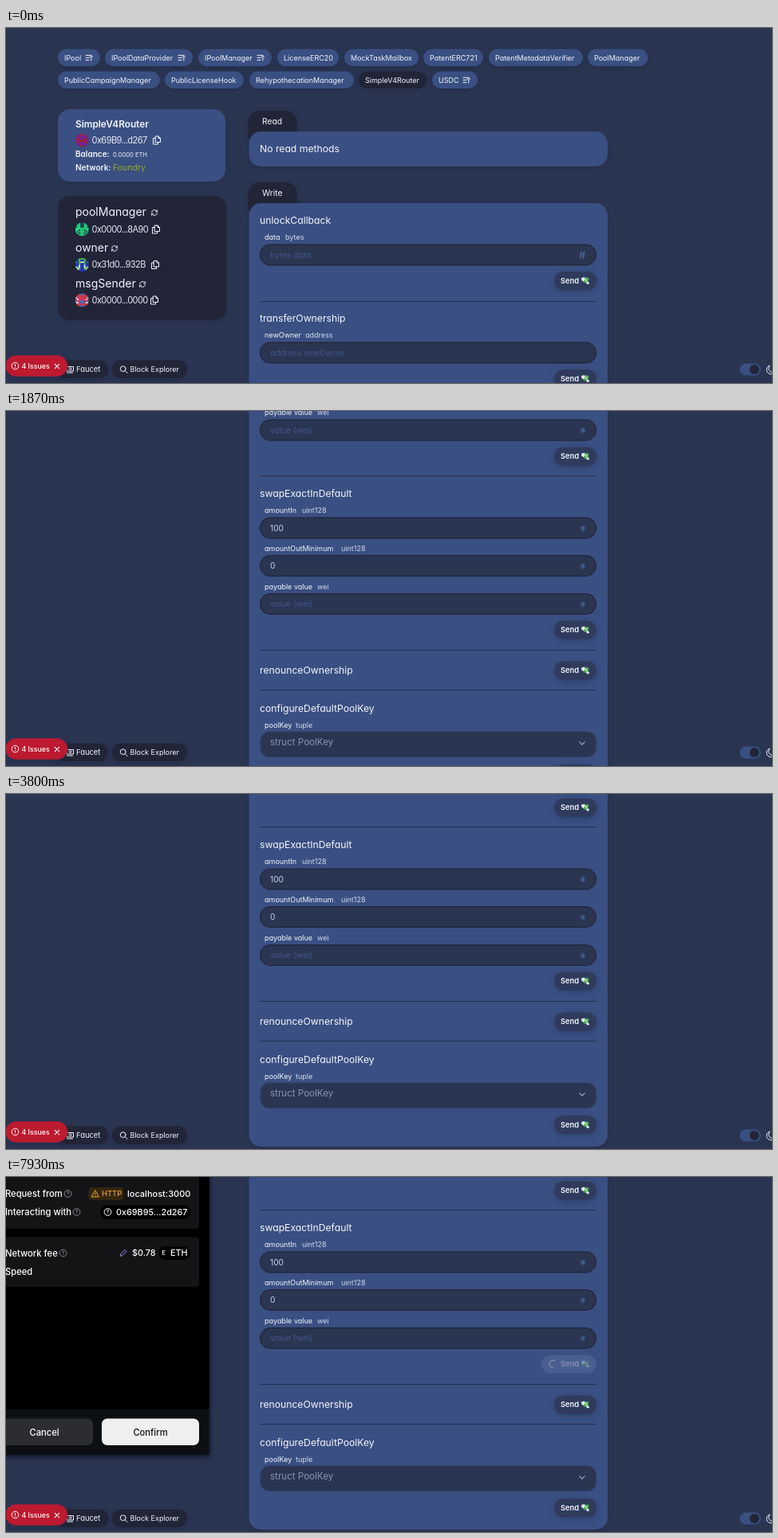
Animation of 960x446 px, one loop 8000 ms. Source, as an HTML page:

```html
<!DOCTYPE html>
<html lang="en">
<head>
<meta charset="utf-8">
<title>Debug Contracts</title>
<style>
  html, body { margin: 0; width: 100%; height: 100%; overflow: hidden; background: #2a3552; }
  svg { display: block; width: 960px; height: 446px; font-family: Inter, "Open Sans", sans-serif; font-feature-settings: "cv11"; }
  text { white-space: pre; }
  .icon { fill: none; stroke-linecap: round; stroke-linejoin: round; }
  .shadow { filter: drop-shadow(0 2px 3px #1b213650); }
  .wallet { font-feature-settings: normal; }
</style>
</head>
<body>
<svg id="stage" viewBox="0 0 960 446" xmlns="http://www.w3.org/2000/svg"></svg>
<script>
const LOOP = 8000, FPS = 15;
const C = { card: '#3a4f82', dark: '#212537', page: '#2a3552', alt: '#2f3b5d', line: '#252e4a', white: '#f4f6fc', hint: '#41578a' };

const text = (x, y, str, size = 12, fill = C.white, attrs = '') =>
  `<text x="${x}" y="${y + size * 0.36}" font-size="${size}" fill="${fill}" ${attrs}>${str}</text>`;
const bold = 'font-weight="600"', medium = 'font-weight="500"';
const box = (x1, y1, x2, y2, r, fill, attrs = '') =>
  `<rect x="${x1}" y="${y1}" width="${x2 - x1}" height="${y2 - y1}" rx="${r}" fill="${fill}" ${attrs}/>`;
const icon = (x, y, d, color = C.white, width = 1) =>
  `<path class="icon" transform="translate(${x} ${y})" d="${d}" stroke="${color}" stroke-width="${width}"/>`;
const hr = y => box(318, y, 740, y + 1, 0, C.line);

const ICON = {
  copy: 'M-1.5-5h3.5l2.5 2.5v5h-6zM2-5v2.5h2.5M-1.5-2.5h-3v7.5h6v-2.5',
  refresh: 'M-3.4-.5a3.4 3.4 0 0 1 6-1.7l.9 1M3.5-3.2v2h-2M3.4.5a3.4 3.4 0 0 1-6 1.7l-.9-1M-3.5 3.2v-2h2',
  sort: 'M-4-3h7M-4 0h4M-4 3h4M2.8 3.6v-4.4M1-.8 2.8-2.6 4.6-.8',
  chevron: 'M-3.2-1.6 0 1.6 3.2-1.6',
  close: 'M-2.7-2.7 2.7 2.7M2.7-2.7-2.7 2.7',
  search: 'M2 2 4.5 4.5M2.6-.8a3.4 3.4 0 1 1-6.8 0a3.4 3.4 0 1 1 6.8 0',
  note: 'M-4-3.5h8v5.5h-8zM-4 4h7M1.4-.8a1.4 1.4 0 1 1-2.8 0a1.4 1.4 0 1 1 2.8 0',
  moon: 'M5 2.2A5.5 5.5 0 1 1-1.6-5 4.6 4.6 0 0 0 5 2.2z',
  star: 'M0-3v6M-2.6-1.5 2.6 1.5M2.6-1.5-2.6 1.5',
  warn: 'M0-4 4.5 4h-9zM0-1.2v2M0 2.5v.1',
  pencil: 'M-3.5 3.5-3 1 2-4 4-2-1 3z'
};

const money = (x, y) => `<g transform="translate(${x} ${y})">
  <path d="M-5-3.5-1-4.5.5-1.5-2.5 1-4.5-.5z" fill="#e6eef2"/>
  <path d="M1-4.5 4.8-3 2 3.2-2.5 2z" fill="#4fb34f"/>
  <circle cx="1.2" cy="-.8" r="1.2" fill="#c5e6a6"/><path d="M1 2.5 3.5.5 5.2 3.8 2.5 4.6z" fill="#e6eef2"/></g>`;

const send = (y, id = '') => `<g ${id && `id="${id}"`}>
  ${box(687, y - 11.5, 740, y + 11.5, 11.5, C.alt, 'class="shadow"')}${text(695, y, 'Send', 9.3, C.white, bold)}${money(726, y)}</g>`;
const label = (y, name, type, typeX) => text(324, y, name, 9) + text(typeX, y, type, 9, '#d3dbef');
const field = (y, hint, mark = '', value) =>
  box(318.6, y - 12.9, 739.4, y + 12.9, 12.9, C.page, `stroke="${C.dark}" stroke-width="1.2"`) +
  (value ? text(331, y, value, 10.2, '#ccd4e8') : text(331, y, hint, 10.2, C.hint)) +
  (mark === '#' ? text(718, y, '#', 13, '#4c669c', medium) : mark && icon(723, y + 0.5, ICON.star, '#4c669c', 1.3));
const weiField = y => label(y, 'payable value', 'wei', 390) + field(y + 22, 'value (wei)', '*');
const struct = (y, name) =>
  box(319, y, 739.5, y + 31.5, 11, C.page, 'stroke="#2f3c60"') + text(331, y + 13, name, 11.6, '#8793b0') +
  icon(722, y + 14.5, ICON.chevron, '#a3aec8', 1.1);

// Symmetric 8x8 identicon from a small linear congruential generator.
function avatar(cx, cy, seed, colors) {
  let s = seed, cells = '';
  const random = () => (s = (s * 16807) % 2147483647) / 2147483647;
  for (let row = 0; row < 8; row++) for (let col = 0; col < 4; col++) {
    const color = colors[Math.floor(random() * colors.length)];
    for (const c of [col, 7 - col])
      cells += `<rect x="${c}" y="${row}" width="1.05" height="1.05" fill="${color}"/>`;
  }
  return `<g transform="translate(${cx - 8.4} ${cy - 8.4}) scale(2.1)" clip-path="url(#round)">${cells}</g>`;
}
const address = (y, str, copyX, seed, colors) =>
  avatar(95.3, y, seed, colors) + text(107.5, y, str, 11.1, '#e3e8f4', 'letter-spacing="-.6"') + icon(copyX, y, ICON.copy);
const variable = (y, name, iconX) => text(87, y, name, 14) + icon(iconX, y + 1, ICON.refresh, C.white, 0.9);

const pill = (y, [x1, x2, name, iconX, active]) =>
  box(x1, y - 10.7, x2, y + 10.7, 10.7, active ? C.dark : C.card, 'class="shadow"') +
  text(x1 + 8, y, name, 9) + (iconX ? icon(iconX, y, ICON.sort) : '');
const rows = [
  [[65, 118, 'IPool', 104], [124, 234, 'IPoolDataProvider', 220], [241, 333, 'IPoolManager', 319],
   [340, 417, 'LicenseERC20'], [424, 517, 'MockTaskMailbox'], [523, 598, 'PatentERC721'],
   [605, 723, 'PatentMetadataVerifier'], [729, 804.5, 'PoolManager']],
  [[65, 193, 'PublicCampaignManager'], [199, 298, 'PublicLicenseHook'], [305, 436, 'RehypothecationManager'],
   [442, 527.5, 'SimpleV4Router', 0, true], [534, 591, 'USDC', 577]]
];
const tab = (y, name) => box(303.5, y, 364.5, y + 44, 14, C.dark, 'class="shadow"') + text(321, y + 13.5, name, 10.3);

const sidebar =
  box(65, 102, 275, 193, 15, C.card, 'class="shadow"') +
  text(87, 121, 'SimpleV4Router', 11.8, C.white, bold) +
  address(141, '0x69B9...d267', 189, 90210, ['#7d1d96', '#7d1d96', '#7d1d96', '#a5271f']) +
  text(87, 158.5, 'Balance:', 10, C.white, bold) + text(134, 159, '0.0000 ETH', 7.6) +
  text(87, 175, 'Network:', 10, C.white, bold) + text(134, 175, 'Foundry', 10.5, '#9aac20') +
  box(65, 211, 276, 367, 15, C.dark, 'class="shadow"') +
  variable(231, 'poolManager', 186) + address(253, '0x0000...8A90', 188, 412, ['#20d67c', '#20d67c', '#1b4b5a']) +
  variable(276, 'owner', 136) + address(297.5, '0x31d0...932B', 187, 933, ['#2531c9', '#2531c9', '#d6f2e0', '#4cc640']) +
  variable(321, 'msgSender', 171) + address(342, '0x0000...0000', 186, 777123, ['#e03a50', '#e03a50', '#3b78d8', '#d8d4e8']);

const contract =
  tab(104, 'Read') + box(304.5, 130, 754, 174, 15, C.card, 'class="shadow"') + text(318, 152, 'No read methods', 12.2) +
  tab(194, 'Write') + box(304.5, 220, 754, 1044, 15, C.card, 'class="shadow"') +
  text(318, 242, 'unlockCallback', 12.2) + label(263, 'data', 'bytes', 350) + field(285, 'bytes data', '#') + send(317.5) + hr(343) +
  text(318, 365, 'transferOwnership', 12.2) + label(386, 'newOwner', 'address', 375) + field(408, 'address newOwner') + send(440.5) + hr(466) +
  text(318, 489, 'swapExactInSingleToSender', 12.2) + label(509.5, 'params', 'tuple', 362) +
  struct(518, 'struct IV4Router_ExactInputSingleParams') + weiField(563) + send(618) + hr(642) +
  text(318, 665, 'swapExactInDefault', 12.2) + label(686, 'amountIn', 'uint128', 371) + field(708, '', '*', '100') +
  label(734, 'amountOutMinimum', 'uint128', 420) + field(755.5, '', '*', '0') + weiField(781.5) + send(836, 'idle') +
  `<g id="busy">${box(671, 824.5, 740, 847.5, 11.5, '#4a5e8f')}
    <g opacity=".35">${text(695, 836, 'Send', 9.3, C.white, bold)}${money(726, 836)}</g>
    <circle id="busyArc" cx="685.5" cy="836" r="4.6" class="icon" stroke="#8492b5" stroke-width="1.2" pathLength="59.7"/></g>` +
  hr(861) + text(318, 887, 'renounceOwnership', 12.2) + send(887) + hr(911) +
  text(318, 934.5, 'configureDefaultPoolKey', 12.2) + label(955.5, 'poolKey', 'tuple', 363) +
  struct(964, 'struct PoolKey') + send(1016.5);

const banner =
  box(0, 1100, 960, 1243, 0, C.alt) +
  text(482, 1141, 'Debug Contracts', 28.2, C.white, 'text-anchor="middle" font-weight="300"') +
  text(482, 1176, 'You can debug &amp; interact with your deployed contracts here.', 12.2, C.white, 'text-anchor="middle"') +
  text(342, 1192.5, 'Check', 12) + box(380, 1186.5, 622, 1201, 0, '#1d2233') +
  text(382.5, 1193, 'packages/nextjs/app/debug/page.tsx', 11.6, C.white,
    'font-weight="700" font-style="italic" font-family="Liberation Mono, monospace"');

const help = (x, y, color = '#85898f') =>
  `<circle cx="${x}" cy="${y}" r="4.4" fill="none" stroke="${color}"/>` + text(x, y, '?', 6.5, color, `text-anchor="middle" ${bold}`);
const walletText = (x, y, str, size = 11.2, color = '#fff') => text(x, y, str, size, color, medium);
const wallet = `<g id="wallet" class="wallet" visibility="hidden">
  ${box(-10, -10, 254.5, 349, 0, '#0d1013', 'style="filter:drop-shadow(1px 2px 3px #0d1122)"')}
  <g id="splash"><circle cx="114.5" cy="85" r="55" fill="#e5602c"/>
    <circle id="ring" cx="114.8" cy="162.5" r="8" fill="none" stroke="#e9a044" stroke-width="2.5" stroke-dasharray="${'2.3 .6 '.repeat(14)}0 20"/></g>
  <g id="confirm">
    ${box(-10, -10, 254.5, 292, 0, '#000')}
    ${box(-10, -10, 242, 65, 4, '#131416')}${box(-10, 75.5, 242, 138, 4, '#131416')}
    ${walletText(-1, 21, 'Request from')}${help(77.5, 21)}
    ${box(103.5, 13, 147, 29, 4, '#33260f')}${icon(112, 21, ICON.warn, '#eca22c')}${walletText(120, 21, 'HTTP', 9.4, '#eca22c')}
    ${walletText(152, 21, 'localhost:3000', 11)}
    ${walletText(-1, 44, 'Interacting with')}${help(88.5, 44)}
    ${box(118, 35.5, 231, 53, 8.7, '#000')}${help(127.5, 44, '#fff')}${walletText(138, 44, '0x69B95...2d267', 10.8)}
    ${walletText(-1, 95.5, 'Network fee')}${help(71.5, 95.5)}${icon(147, 95.5, ICON.pencil, '#9b93ff')}
    ${walletText(158, 95.5, '$0.78', 10.8)}${box(191, 87, 231, 104, 8.5, '#000')}
    ${walletText(195.5, 95.5, 'E', 7.5)}${walletText(206, 95.5, 'ETH', 10.8)}
    ${walletText(-1, 119, 'Speed')}
    ${box(-13, 303.5, 109, 337, 7, '#2b2d30')}${box(120, 303.5, 242, 337, 7, '#fff', 'id="accept"')}
    ${text(48, 320.5, 'Cancel', 11.2, '#fff', `text-anchor="middle" ${medium}`)}
    ${text(181, 320.5, 'Confirm', 11.2, '#111', `text-anchor="middle" ${medium}`)}
  </g></g>`;

const fixed =
  box(62, 417.5, 128, 440, 11.2, C.dark, 'class="shadow"') + icon(80.5, 429, ICON.note) + text(88, 429, 'Faucet', 9.4) +
  box(133, 417.5, 227, 440, 11.2, C.dark, 'class="shadow"') + icon(147.5, 429, ICON.search) + text(155.5, 429, 'Block Explorer', 9) +
  box(919.5, 421.5, 946, 436.5, 7.5, C.card) + `<circle cx="938" cy="429" r="6" fill="${C.dark}"/>` +
  icon(959, 429, ICON.moon) +
  box(-0.5, 411.5, 77, 437.5, 13, '#bd1a30', 'stroke="#93203c" class="shadow"') +
  `<circle cx="11.5" cy="424.5" r="4.3" fill="none" stroke="#fff"/>` + icon(11.5, 424.5, 'M0-2v2.2M0 2v.1', '#fff') +
  text(19.5, 424.5, '4 Issues', 8.8, '#fff', medium) + icon(64, 425, ICON.close, '#fff', 1.1);

const $ = id => document.getElementById(id);
$('stage').innerHTML =
  `<defs><clipPath id="round"><circle cx="4" cy="4" r="4"/></clipPath></defs>
  <g id="doc">${rows.map((row, i) => row.map(p => pill(37.3 + i * 28, p)).join('')).join('')}${sidebar}${contract}${banner}</g>${wallet}${fixed}`;

const mix = (a, b, u) => a + (b - a) * u;
const progress = (t, from, to) => Math.min(1, Math.max(0, (t - from) / (to - from)));
const easeInOut = u => u ** 1.715 / (u ** 1.715 + (1 - u) ** 1.715);
const tick = n => n * 1000 / FPS;

function scrollAt(t) {
  if (t < tick(29)) return mix(0, 561, easeInOut(progress(t, tick(16), tick(28))));
  if (t < tick(39)) return mix(561, 847, easeInOut(progress(t, tick(29), tick(34))));
  return mix(847, 601, progress(t, tick(39), tick(44)) ** 1.884);
}

const show = (id, on) => $(id).setAttribute('visibility', on ? 'inherit' : 'hidden');

// The arc grows, then chases its own tail, while the whole circle turns.
function spinBusy(t) {
  const u = (t % 1500) / 1500, grow = progress(u, 0, 0.475), chase = progress(u, 0.475, 0.95);
  const start = 16 * grow + 43 * chase, length = Math.min(42 * grow, 59.7 - start);
  const arc = $('busyArc');
  arc.setAttribute('stroke-dasharray', `${Math.max(length, 0.1)} 100`);
  arc.setAttribute('transform', `rotate(${t * 0.18 + start / 59.7 * 360} 685.5 836)`);
}

function draw(now) {
  const t = tick(Math.floor((now % LOOP + 5) * FPS / 1000));
  $('doc').setAttribute('transform', `translate(0 ${-Math.round(scrollAt(t))})`);
  const busy = t >= tick(58) && t < LOOP, open = t >= tick(75) && t < LOOP, ready = t >= tick(102);
  show('idle', !busy);
  show('busy', busy);
  $('wallet').setAttribute('visibility', open ? 'visible' : 'hidden');
  show('splash', !ready);
  show('confirm', ready);
  $('accept').setAttribute('fill', t >= tick(113) ? '#efefef' : '#fff');
  spinBusy(t + 147);
  $('ring').setAttribute('transform', `rotate(${(t - tick(95)) * 0.36 - 68} 114.8 162.5)`);
}

const begin = performance.now();
(function loop() {
  draw(performance.now() - begin);
  requestAnimationFrame(loop);
})();
</script>
</body>
</html>
```
